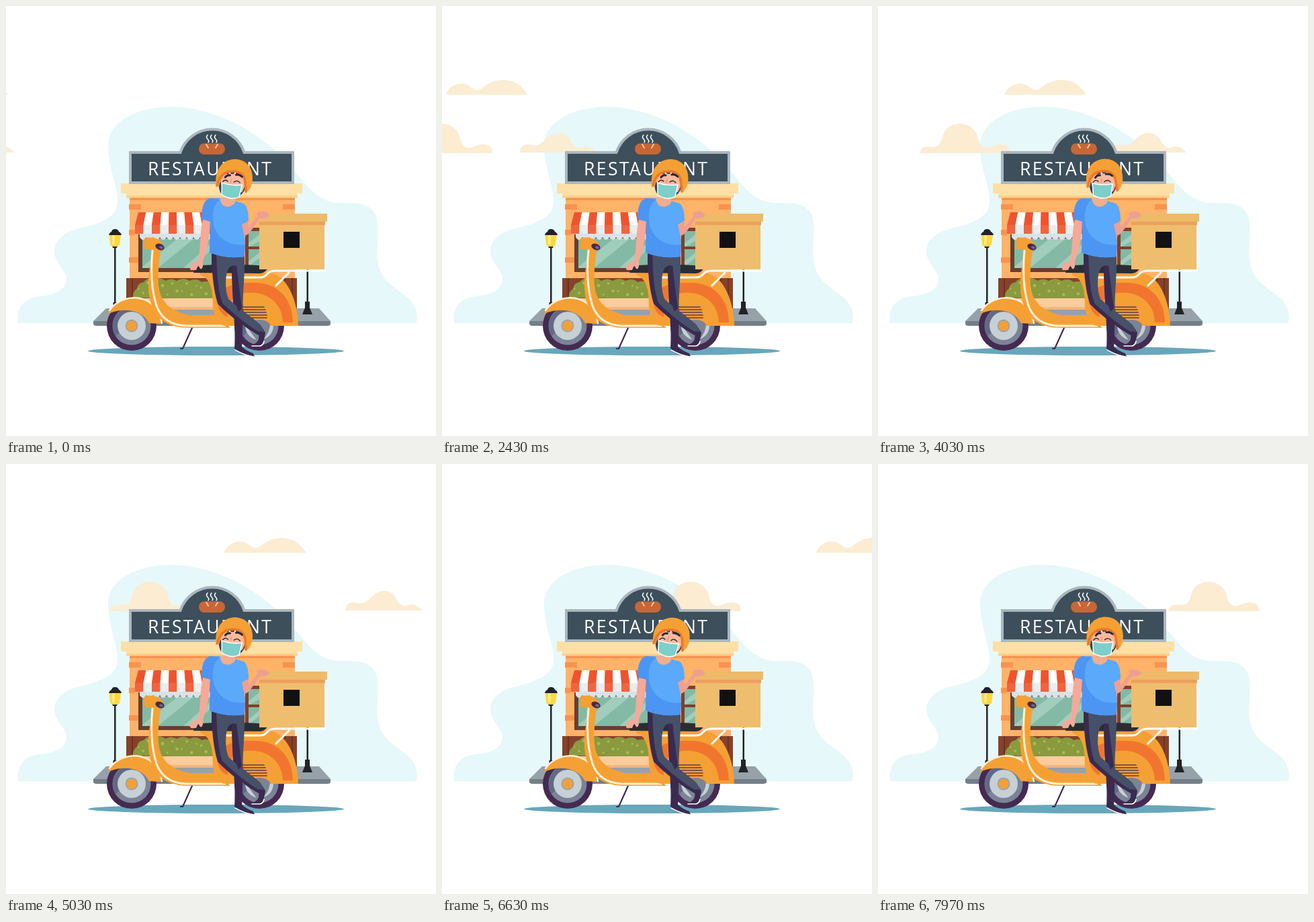
Write an HTML page that moves like this. It is 640 px wide and 640 px high and loops after 8 s.

```html
<!DOCTYPE html>
<html lang="en">
<head>
<meta charset="utf-8">
<title>Scooter delivery</title>
<style>
  html, body { margin: 0; width: 100%; height: 100%; overflow: hidden; background: #fff; }
  svg { display: block; width: 100%; height: 100%; }
  text { font: 500 26.5px "Open Sans", "Noto Sans", sans-serif; letter-spacing: 2.4px; fill: #fff; }
  .line { fill: none; stroke-linecap: round; stroke-linejoin: round; }
</style>
</head>
<body>
<svg viewBox="0 0 640 640">
  <defs>
    <g id="wheel">
      <circle r="37" fill="#452a52"/>
      <circle r="28.5" fill="#7b8497"/>
      <path d="M-24 15A28.5 28.5 0 0 1 15-24L10-18A21 21 0 0 0-18 10Z" fill="#616a83"/>
      <circle r="21" fill="#c6d0d5"/>
      <circle r="9.5" fill="#9ba5b0"/>
      <circle r="7.5" fill="#f5a034"/>
    </g>
    <clipPath id="pane"><path d="M203 346H306V390H203Z"/></clipPath>
  </defs>

  <path fill="#e6f8f9" d="M18 472C15 455 22 435 50 432C75 430 90 422 90 405C89 392 72 382 72 365C73 345 90 336 110 331C140 324 163 315 166 295C168 270 152 245 152 207C153 170 198 150 246 150C320 151 390 196 430 246C452 274 468 291 493 293C516 294 536 290 548 307C561 330 546 363 556 391C566 420 598 426 608 447C613 458 613 467 610 472Z"/>

  <g fill="#fbecd2">
    <path id="cloudA" d="M0 132C7 115 26 111 38 121C44 126 50 127 57 120C75 106 105 104 122 132Z"/>
    <path id="cloudB" d="M0 219C2 210 8 208 18 210C31 210 32 201 35 192C41 170 78 169 86 193C89 204 91 213 103 211C114 206 121 205 127 207C134 208 134 214 135 219Z"/>
    <path id="cloudC" d="M0 218C1 208 8 204 18 207C37 211 37 190 58 189C80 189 74 214 92 211C100 206 109 211 114 218Z"/>
  </g>

  <!-- pavement and lamps -->
  <path fill="#97a1a9" d="M149 450H466L483 469H130Z"/>
  <path fill="#737f88" d="M130 469H483V473Q483 476 478 476H135Q130 476 130 473Z"/>
  <g fill="#222326">
    <path d="M161 356H163.5V441H165V448H159.500V441H161Z"/>
    <path d="M153 341Q154 337 157 336Q158 332 162 332Q167 332 168 336Q171 337 172 341Z"/>
    <path d="M158 357H166L165 360H159Z"/>
    <path d="M447.500 392H450V440H452V449L456 459H441L445 449V440H447.500Z"/>
  </g>
  <path fill="#ffd83f" d="M153.500 341H171L169 355Q168 358 165 358H160Q156 358 155 355Z"/>
  <path fill="#ffea8a" d="M158 341H162V355H158Z"/>

  <!-- restaurant -->
  <path fill="#ffb369" d="M184 285H430V406H184Z"/>
  <path fill="#f9934f" d="M184 285H430V289H184ZM183 295H201V303H183ZM183 333H192V341H183ZM183 374H197V382H183ZM412 295H430V303H412Z"/>
  <path fill="#fee0a6" d="M171 264H441V279H171Z"/>
  <path fill="#fbd18b" d="M179 279H434V285.500H179Z"/>
  <path fill="#fee0a6" d="M179 279H434V282H179Z"/>
  <path fill="#3d4f5b" stroke="#acb6bd" stroke-width="4" d="M185 218H259.500A50 50 0 0 1 354.500 218H427V263H185Z"/>
  <text x="211" y="252">RESTAURANT</text>
  <rect x="287" y="204.500" width="39" height="16.500" rx="8" fill="#c86636"/>
  <path class="line" stroke="#f5c9a0" stroke-width="2" d="M298 206L301 211M315 206L312 211"/>
  <path class="line" stroke="#fff" stroke-width="1.500" d="M300 192q-3 3 0 6t1 5M306 192q-3 3 0 6t1 5M312 192q-3 3 0 6t1 5"/>

  <path fill="#67402f" d="M197 340H312V396H197Z"/>
  <g clip-path="url(#pane)">
    <path fill="#83b9a5" d="M203 346H306V390H203Z"/>
    <path fill="#a1cdbc" d="M256 346H280L226 390H203V388ZM310 349V360L274 390H264Z"/>
  </g>
  <g id="awning"></g>
  <path fill="#80402a" d="M356 330H380V406H356Z"/>
  <path fill="#83b9a5" d="M361 335H377V358H361ZM361 362H377V392H361Z"/>
  <path fill="#a1cdbc" d="M377 340V350L363 358H361V353ZM377 367V375L361 388V380Z"/>
  <path fill="#86412a" d="M179 405H433V450H179Z"/>
  <path fill="#6e321f" d="M187 405H189V450H187ZM414 405H416V450H414ZM425 405H427V450H425Z"/>
  <path fill="#8a9a3f" d="M189 434Q188 425 195 421Q196 412 205 411Q211 403 220 408Q229 402 237 409Q246 404 254 409Q264 403 273 409Q284 404 291 411Q304 407 308 416Q318 423 314 436Z"/>
  <g id="leaves" fill="#a8b94f"></g>
  <path fill="#fbcc9c" d="M204 435H315V452H204Z"/>
  <path fill="#f3b57f" d="M204 448H315V452H204Z"/>

  <ellipse cx="312.500" cy="513.500" rx="190.500" ry="6.500" fill="#68a7bb"/>

  <!-- scooter -->
  <path class="line" stroke="#452a52" stroke-width="2.200" d="M277 479L263 510H260"/>
  <use href="#wheel" x="187" y="476"/>
  <use href="#wheel" x="377" y="476"/>
  <path fill="#f5a034" d="M152 458C160 440 176 433 192 434C213 436 229 452 231 473L213 472C203 452 176 448 152 458Z"/>
  <path class="line" stroke="#fff2d8" stroke-width="2.500" d="M154 453C174 425 224 426 232 472"/>
  <path fill="#f5a034" d="M206 346Q222 341 233 353L235 360L230 364C226 395 224 418 232 434C239 448 252 455 272 460H316L334 479H270C237 478 218 463 213 430C209 407 216 386 217 363L205 361Z"/>
  <path class="line" stroke="#fff2d8" stroke-width="3" d="M218 364C215 395 217 424 224 446C231 465 246 475 268 476H326"/>
  <ellipse cx="229" cy="358.500" rx="7" ry="4.500" transform="rotate(22 229 358.500)" fill="#452a52"/>
  <ellipse cx="231" cy="359.500" rx="3" ry="2" transform="rotate(22 231 359.500)" fill="#746783"/>
  <path fill="#f5a034" d="M289 397H390C416 398 434 434 435 476H326C315 475 310 465 308 448C308 424 306 407 289 400Z"/>
  <path fill="#f1752f" d="M315 439C316 417 340 411 371 412C407 412 427 439 427 471H404C402 450 393 437 375 435C350 430 331 435 330 463C322 461 314 451 315 439Z"/>
  <path fill="#f5a034" d="M330 463C329 434 344 425 371 427C397 430 411 448 412 471H338Z"/>
  <path fill="#7b8497" d="M355 473C370 466 385 464 393 474C392 488 384 497 375 500Z"/>
  <path class="line" stroke="#5b3c45" stroke-width="1.700" d="M349 448H384M351 452H386M353 456H387M355 460H388M357 464H388"/>
  <path fill="#2b2d35" d="M279 397Q281 388 290 386Q340 383 391 387Q387 398 378 398Z"/>
  <path class="line" stroke="#fff" stroke-width="3" d="M323 404H375C391 405 386 394 401 394H474M402 416L421 397"/>

  <!-- delivery box -->
  <path fill="#efbd6e" d="M377 309H474V392H377Z"/>
  <path fill="#eda05f" d="M377 320H475V326H377Z"/>
  <path fill="#edba69" d="M377 309H478V321H377Z"/>
  <rect x="413" y="336" width="24" height="24" fill="#111"/>

  <!-- courier -->
  <path fill="#f3aa98" d="M293 318L304 320C303 343 300 364 293 380C294 388 292 393 289 391L286 386L283 393L275 393Q272 388 277 383L286 379C290 361 288 337 293 318Z"/>
  <path fill="#eda092" d="M351 322L360 319L361 329L374 313Q371 308 377 306L386 306Q392 308 391 313Q386 317 378 316L363 337Q355 345 351 340Z"/>
  <path fill="#3b2a4f" d="M337 370L354 373C355 403 350 432 353 459L351 510H340C343 472 334 431 337 370Z"/>
  <path fill="#475069" d="M343 372H355C356 405 351 432 353 460L350 467C347 434 343 400 343 372Z"/>
  <path fill="#3b2a4f" d="M306 366L330 369C325 397 325 424 330 437C342 449 365 462 378 474L386 486L378 491C361 482 333 462 315 443C308 419 306 392 306 366Z"/>
  <path fill="#475069" d="M313 367L354 371L354 386L336 387C325 389 325 425 332 437C346 449 365 462 379 475L384 485L380 487C360 476 342 461 322 442C314 419 314 389 313 367Z"/>
  <path fill="#3b2a4f" d="M337 386L343 387L351 450L346 455C338 435 335 409 337 386Z"/>
  <path fill="#3b2a4f" d="M377 484Q382 484 386 487L383 502Q382 506 376 506L365 505Q374 502 376 496Z"/>
  <path class="line" stroke="#fff" stroke-width="1.600" d="M366 506H378Q383 505 384 499"/>
  <path fill="#3b2a4f" d="M341 507H351Q359 514 368 517L370 522Q354 521 341 513Z"/>
  <path class="line" stroke="#fff" stroke-width="1.500" d="M341 512Q355 520 369 522"/>
  <path fill="#5ba9fb" d="M305 286L318 286Q329 304 341 290L354 294Q361 300 361 320L351 325L356 348L355 373Q328 377 303 367L305 320Z"/>
  <path fill="#4c95f3" d="M305 286C294 287 291 302 291 317L304 321L303 367Q328 377 355 373L356 355C335 358 315 348 309 326C306 309 309 293 319 288Z"/>
  <path fill="#f1ad8d" d="M318 285H341V293Q333 302 323 297Q319 293 318 285Z"/>

  <g id="head">
    <path fill="#344262" d="M316 262L326 262L330 286L322 282Q316 276 316 262ZM350 266L357 264Q356 277 348 282Z"/>
    <path fill="#fbb99d" d="M319 250H356Q357 268 351 277L325 278Q318 267 319 250Z"/>
    <path fill="#f5a034" d="M312 264C311 240 324 228 341 228C360 229 369 244 366 263Q364 274 356 278L354 263C352 251 345 247 336 247C325 248 319 257 317 268L312 270Z"/>
    <path class="line" stroke="#ef772d" stroke-width="3.500" d="M314 267C317 253 325 246 337 246C350 246 356 253 356 264L357 276"/>
    <path class="line" stroke="#262a38" stroke-width="3" d="M326 255Q329 251 333 252M342 251Q347 250 351 254"/>
    <path class="line" stroke="#262a38" stroke-width="1.400" d="M322 262Q326 257 330 261M339 262Q344 258 348 263"/>
    <path class="line" stroke="#ef927e" stroke-width="1.500" d="M335 258L334 263"/>
    <path fill="#7dcfc9" stroke="#fff" stroke-width="1.500" stroke-linejoin="round" d="M321 263Q334 268 351 266L347 284Q335 290 321 281Z"/>
  </g>
</svg>
<script>
  const LOOP = 8000;
  const el = id => document.getElementById(id);

  // Awning: nine flaring stripes, each with a hanging flap.
  let stripes = '<path fill="#d8e3e8" d="M199 338H309V344' + 'q-5 8-10 0'.repeat(11) + 'Z"/>';
  for (let i = 0; i < 9; i++) {
    const top = 197 + i * 11.4, bottom = 192 + i * 12.5, right = bottom + 12.5;
    const [roof, flap] = i % 2 ? ['#fff', '#e9edef'] : ['#ee5330', '#f0643f'];
    stripes += `<path fill="${roof}" d="M${top} 307H${top + 11.4}L${right} 326H${bottom}Z"/>
      <path fill="${flap}" d="M${bottom} 326H${right}V339H${bottom}Z"/>`;
  }
  el('awning').innerHTML = stripes;

  el('leaves').innerHTML = Array.from({ length: 16 }, (_, i) =>
    `<circle cx="${197 + i * 7.2}" cy="${421 + 9 * Math.sin(i * 2.4)}" r="${1.4 + i % 3 * .5}"/>`).join('');

  // Position for a speed that rises and falls as a parabola around its peak.
  const glide = (t, middle, speed, peak, span) => {
    const d = t - peak;
    return middle + speed * (d - d ** 3 / (3 * span ** 2));
  };
  const clouds = [
    ['cloudA', 465, .146, 6000, 6000],
    ['cloudB', 234, .098, 5850, 5650],
    ['cloudC', 565, .1635, 5400, 6300]
  ].map(([id, ...path]) => [el(id), path]);
  const head = el('head');

  function draw(now) {
    const t = now % LOOP;
    for (const [cloud, path] of clouds)
      cloud.setAttribute('transform', `translate(${glide(t, ...path)})`);
    const tilt = 4.5 * Math.cos((t - 1150) / 5000 * 2 * Math.PI);
    head.setAttribute('transform', `rotate(${tilt} 331 290)`);
    requestAnimationFrame(draw);
  }
  draw(performance.now());
</script>
</body>
</html>
```
